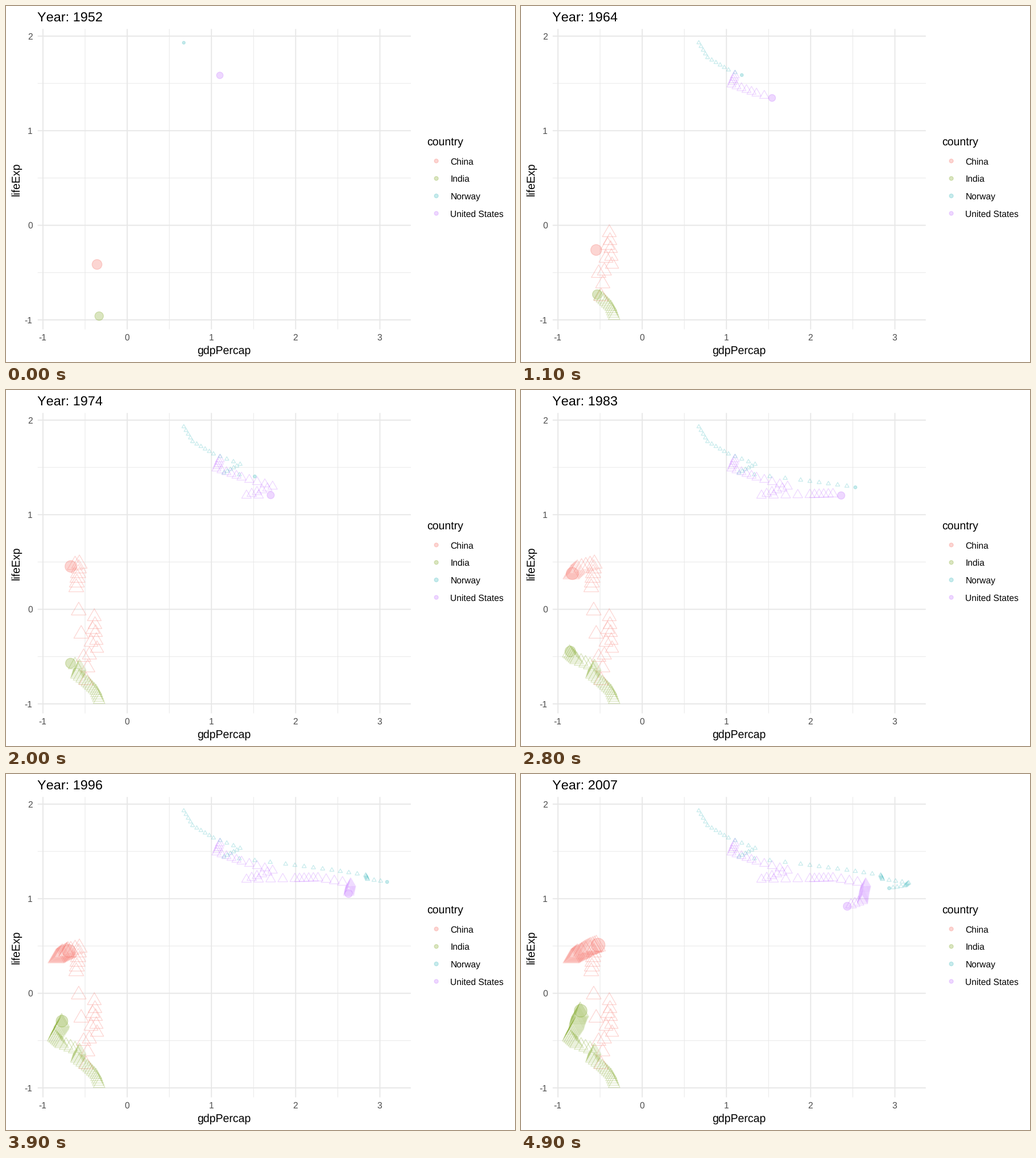
Write a matplotlib script that moves like this. It is 895 px wide and 626 px high and loops after 5 s.

```python
import numpy as np
import matplotlib.pyplot as plt
from matplotlib.animation import FuncAnimation
from matplotlib.collections import PolyCollection
from matplotlib.colors import to_rgba
from matplotlib.patches import Circle

plt.rcParams.update({
    "font.family": "Liberation Sans",
    "text.hinting": "none",
    "text.kerning_factor": 6,
})

WIDTH, HEIGHT, DPI = 895, 626, 128
FRAMES, INTERVAL = 50, 100
PT = DPI / 72
STROKE = 0.709
LEFT, RIGHT, TOP, BOTTOM = 55.7, 711.8, 40.4, 568.6
GREY = "#4D4D4D"

COUNTRIES = ["China", "India", "Norway", "United States"]
COLORS = [to_rgba(c, 0.3) for c in ("#F8766D", "#86AC30", "#48BDC2", "#C77CFF")]

# One survey every five years, 1952 to 2007
SURVEY = np.arange(12)


def bends(*points):
    """Straight runs between (survey, value) turning points."""
    return np.interp(SURVEY, *zip(*points))


# World mean income in standard deviations; a country's score follows from
# its income as a multiple of that mean.
world = bends((0, .40), (1, .436), (2, .545), (3, .677), (4, .638),
              (5, .875), (6, .972), (8, .903), (11, .905))
wealth = np.array([
    0.105 + 2.17e-5 * SURVEY**4,
    0.11 + 0.0023 * (SURVEY - 5) ** 2,
    bends((0, 2.68), (3, 2.98), (4, 2.80), (6, 3.50), (7, 4.02),
          (8, 4.16), (9, 4.50), (10, 4.45), (11, 4.24)),
    bends((0, 3.75), (1, 3.43), (3, 3.55), (4, 3.22), (6, 3.33),
          (7, 3.83), (8, 3.92), (10, 3.89), (11, 3.69)),
])
gdp = world * (wealth - 1)

life = np.array([
    bends((0, -.414), (1, -.078), (2, -.753), (3, .231), (4, .481), (6, .371), (11, .51)),
    -0.96 + 0.098 * SURVEY - 0.0025 * SURVEY**2,
    0.98 + 0.95 * np.exp(-0.18 * SURVEY),
    bends((0, 1.585), (4, 1.203), (6, 1.218), (11, .92)),
])

# Millions of people
population = np.array([
    np.linspace(556, 1319, 12),
    np.geomspace(372, 1110, 12),
    np.linspace(3.3, 4.6, 12),
    np.linspace(158, 301, 12),
])


def px(value):
    return 213.1 + 148.12 * np.asarray(value)


def py(value):
    return 385.6 - 166.33 * np.asarray(value)


def point_radius(size):
    return 0.375 * (size * 2.845 + 0.945) * PT


def tween(series):
    """Linear motion between surveys, which fall on whole frames."""
    keys = np.round(np.linspace(0, FRAMES - 1, len(SURVEY)))
    return np.array([np.interp(np.arange(FRAMES), keys, row) for row in series]).T


share = (population - population.min()) / np.ptp(population)
X, Y = px(tween(gdp)), py(tween(life))
R = point_radius(tween(1 + 5 * np.sqrt(share)))

# Triangle with the area of the point's circle
angles = np.radians([-90, 30, 150])
corners = 1.5551 * np.column_stack([np.cos(angles), np.sin(angles)])
TRIANGLES = np.stack([X, Y], -1)[:, :, None] + R[:, :, None, None] * corners

fig = plt.figure(figsize=(WIDTH / DPI, HEIGHT / DPI), dpi=DPI, facecolor="white")
ax = fig.add_axes([0, 0, 1, 1])
ax.set(xlim=(0, WIDTH), ylim=(HEIGHT, 0))
ax.axis("off")


def label(x, y, text, size=8.8, color="black", **kwargs):
    return ax.text(x, y, text, fontsize=size, color=color, va="baseline", **kwargs)


def grid(xs, ys, width):
    style = dict(color="#E7E7E7", lw=width, snap=False, zorder=1)
    ax.vlines(px(xs), TOP, BOTTOM, **style)
    ax.hlines(py(ys), LEFT, RIGHT, **style)


def add_point(x, y, radius, color):
    return ax.add_patch(Circle((x, y), radius, fc=color, ec=color, lw=STROKE, zorder=4))


x_ticks, y_ticks = np.arange(-1, 4), np.arange(-1, 3)
grid(x_ticks[:-1] + 0.5, y_ticks[:-1] + 0.5, 0.533)
grid(x_ticks, y_ticks, 1.067)
for tick in x_ticks:
    label(px(tick) - 0.4, 588.3, str(tick), color=GREY, ha="center")
for tick in y_ticks:
    label(46.6, py(tick) + 5.7, str(tick), color=GREY, ha="right")

title = label(55, 26.4, "", 13.2)
label((LEFT + RIGHT) / 2, 612.2, "gdpPercap", 11, ha="center")
label(24, (TOP + BOTTOM) / 2 + 0.5, "lifeExp", 11, ha="center",
      rotation=90, rotation_mode="anchor")

label(740.6, 245.4, "country", 11)
for i, (name, color) in enumerate(zip(COUNTRIES, COLORS)):
    y = 272.5 + 30.72 * i
    add_point(756.6, y, point_radius(1.5), color)
    label(781.5, y + 5.9, name)

trail = PolyCollection([], facecolors="none", edgecolors=COLORS, linewidths=STROKE,
                       joinstyle="round", zorder=3)
ax.add_collection(trail, autolim=False)
points = [add_point(0, 0, 1, color) for color in COLORS]


def update(frame):
    title.set_text(f"Year: {round(1952 + 55 * frame / (FRAMES - 1))}")
    trail.set_verts(list(TRIANGLES[:frame].reshape(-1, 3, 2)))
    for point, x, y, radius in zip(points, X[frame], Y[frame], R[frame]):
        point.set(center=(x, y), radius=radius)
    return [title, trail, *points]


animation = FuncAnimation(fig, update, frames=FRAMES, interval=INTERVAL,
                          repeat=True, repeat_delay=0)
plt.show()
```
